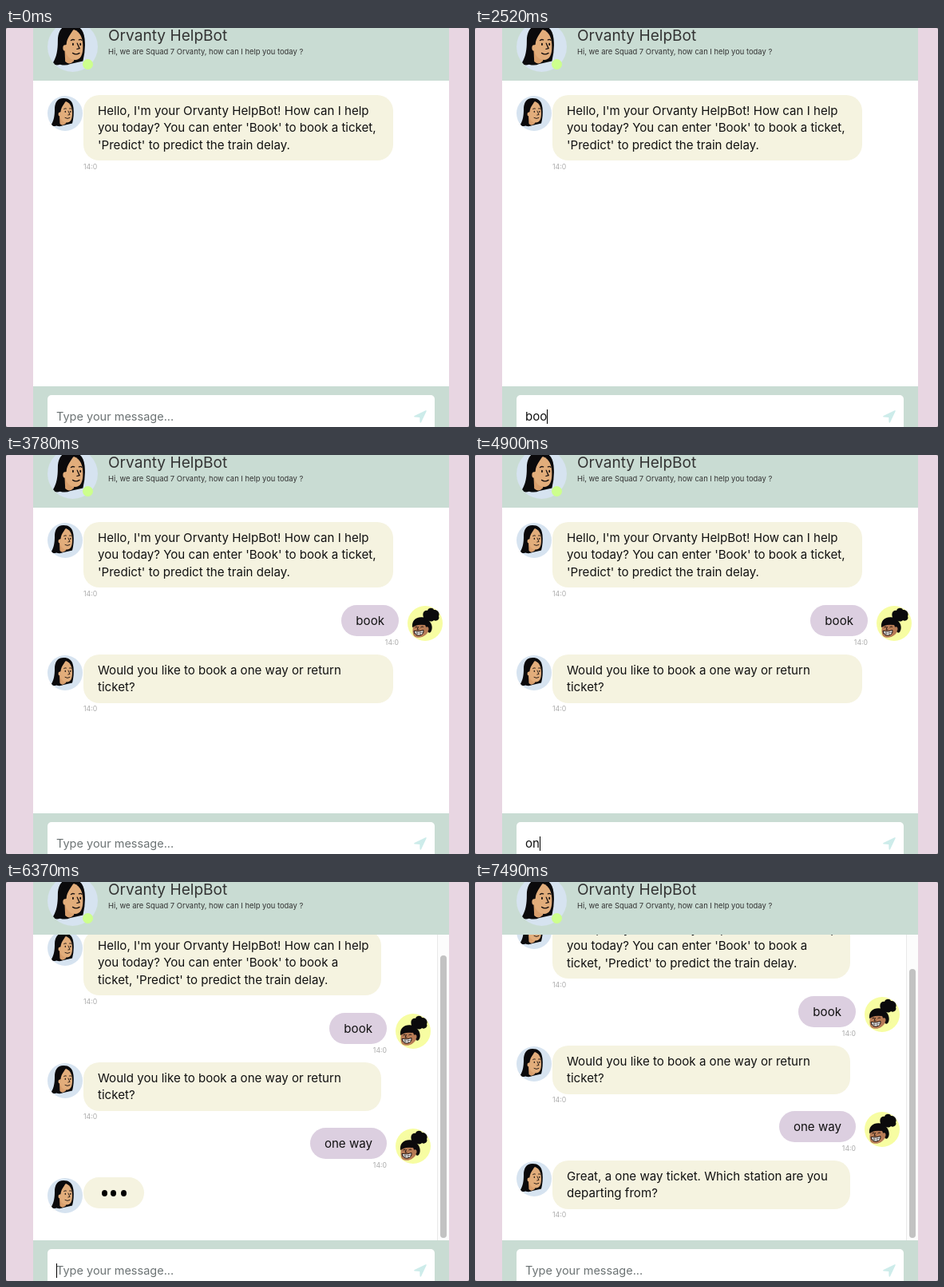
An HTML page for the animation above (8000 ms loop, 580 by 500 pixels).

```html
<!DOCTYPE html>
<html lang="en">
<head>
<meta charset="utf-8">
<title>Chat</title>
<style>
html, body { margin: 0; width: 100%; height: 100%; overflow: hidden; background: #777; }
#stage {
  position: relative; width: 580px; height: 500px; overflow: hidden;
  border-radius: 2px; background: #e8d6e2;
  font: 15.1px/21.43px Inter, sans-serif; color: #111; white-space: nowrap;
}
#stage div, #stage svg { position: absolute; }
.bar { left: 34px; width: 521px; background: #c9dcd3; }
.head { top: 0; height: 66px; }
.foot { top: 449px; height: 51px; }
.title { left: 94px; top: -4px; font-size: 19.1px; line-height: 26px; color: #333; }
.sub { left: 94px; top: 23px; font-size: 9.4px; line-height: 14px; color: #333; }
.status { left: 62px; top: 39px; width: 13px; height: 13px; border-radius: 50%; background: #cdff8d; }
#view { left: 34px; top: 66px; width: 521px; height: 383px; background: #fff; overflow: hidden; }
#chat { left: 0; top: 0; width: 521px; height: 383px; }
#chat.narrow { width: 506px; }
.msg { left: 0; right: 0; }
.msg svg { left: 18px; top: .5px; width: 44px; height: 44px; }
.msg.me svg { left: auto; right: 8.5px; top: 1px; }
.text { left: 63px; right: 70px; padding: 9px 18px; border-radius: 20px; background: #f5f3e0; }
.me .text { left: auto; right: 63px; background: #dccfe0; }
.time { left: 63px; font-size: 8.7px; line-height: 12px; color: #aaa; }
.me .time { left: auto; right: 63px; }
.typing .text { right: auto; width: 40px; height: 21px; }
.typing i { position: absolute; top: 16px; width: 7px; height: 8px; border-radius: 50%; background: #000; }
.narrow .wide, #chat:not(.narrow) .slim { display: none; }
#track { right: 0; top: 0; width: 14px; height: 383px; background: #fcfcfc; border-left: 1px solid #e9e9e9; }
#thumb { left: 3px; width: 8px; border-radius: 4px; background: #c2c2c2; }
.field { left: 18px; top: 11px; width: 485px; height: 54px; border-radius: 5px; background: #fff; }
#input { left: 11px; top: 16px; white-space: pre; }
#input.empty { font-size: 14.5px; color: #6c7374; }
#caret { top: 18px; width: 1px; height: 18px; background: #000; }
.send { left: 458px; top: 18px; width: 18px; height: 18px; }
</style>
</head>
<body>
<svg width="0" height="0" style="position:absolute">
  <clipPath id="disc"><circle cx="22" cy="22" r="22"/></clipPath>
  <symbol id="bot" viewBox="0 0 44 44">
    <g clip-path="url(#disc)">
      <rect width="44" height="44" fill="#d6e3f0"/>
      <path d="M20 3C12 3 9 9 9 17C9 25 8 31 4.500 36.500Q7 39 11 37.500Q16 39 20 37L31 34.500Q33.500 25 32.500 15C31.500 6 27 3 20 3Z" fill="#0b0a0c"/>
      <path d="M15 25L15.500 35Q19 38.500 23 34.500L24 30Z" fill="#d99f6d"/>
      <path d="M23 7C17 11 15 15 15 21C15 29 19 33.500 24 33.500C29 33.500 31 29 31 22C31 15 29 9 23 7Z" fill="#e2ad7b"/>
      <path d="M23 6C20 12 17 14 16.500 20L14 22L13 12Z" fill="#0b0a0c"/>
      <ellipse cx="15.300" cy="23" rx="1.800" ry="2.600" fill="#e2ad7b"/>
      <g fill="none" stroke="#1a1210" stroke-width=".9" stroke-linecap="round">
        <path d="M20.500 16.500Q22 15.200 23.500 16M27.500 16Q29 15.200 30 16.300M26 19L28 23.500L25.800 24M22 27.500Q25 29.500 28 27.500"/>
        <path d="M22.300 19.300V20.300M28.800 19.300V20.300" stroke-width="1.300"/>
      </g>
    </g>
  </symbol>
  <symbol id="user" viewBox="0 0 44 44">
    <g clip-path="url(#disc)"><rect width="44" height="44" fill="#f7fda2"/>
      <path d="M7 24C6 33 6 38 11 39.500C18 41 25 37 28 28L24 19L10 20Z" fill="#b77b55"/>
    </g>
    <path d="M6 27C5 18 11 13 20 14.500C18 9 21 5 25 6C26 2 32 2 33 5C38 4 41 10 39 13C41 17 36 20 33 18C31 20 28 20 26.500 18.500C31 22 32 29 29 33C27 35 25 33 25.500 30Q23 27 22 24Q14 23 10 25Z" fill="#0b0a0c"/>
    <ellipse cx="24.500" cy="29" rx="2" ry="2.800" fill="#b77b55"/>
    <path d="M8 31.500Q14 33 20 30.500Q20.500 36 15 37Q9 37.500 8 31.500Z" fill="#fff" stroke="#1a1210"/>
    <path d="M8 34Q14 35 19.500 33M12 32.500V36.500M16 32.500V36.500" fill="none" stroke="#1a1210" stroke-width=".6"/>
    <path d="M9.500 27Q11 25.600 12.500 27M16.500 27Q18 25.300 20 26.500M13.500 26L12 30H14.500" fill="none" stroke="#1a1210" stroke-width=".9"/>
  </symbol>
</svg>
<div id="stage">
  <div class="bar head">
    <svg style="left:18px;top:-8px;width:63px;height:63px"><use href="#bot"/></svg>
    <div class="status"></div>
    <div class="title">Orvanty HelpBot</div>
    <div class="sub">Hi, we are Squad 7 Orvanty, how can I help you today ?</div>
  </div>
  <div id="view">
    <div id="chat"></div>
    <div id="track"><div id="thumb"></div></div>
  </div>
  <div class="bar foot">
    <div class="field">
      <div id="input"></div>
      <div id="caret"></div>
      <svg class="send" viewBox="0 0 18 18"><path d="M16 2L2 8.800L9 9.200L9.300 16Z" fill="#cdecea" stroke="#cdecea" stroke-width="1.600" stroke-linejoin="round"/></svg>
    </div>
  </div>
</div>
<script>
const $ = id => document.getElementById(id);
const LOOP = 8000, VIEW = 383, LINE = 21.43;

// top: offset in the conversation; from / to: time on screen
const messages = [
  { top: 18, lines: 3, from: 0, text: "Hello, I'm your Orvanty HelpBot! How can I help<br>you today? You can enter 'Book' to book a <br class='slim'>ticket, <br class='wide'>'Predict' to predict the train delay." },
  { top: 122, lines: 1, from: 3290, me: true, text: "book" },
  { top: 184, typing: true, from: 3290, to: 3780 },
  { top: 184, lines: 2, from: 3780, text: "Would you like to book a one way or return<br>ticket?" },
  { top: 266, lines: 1, from: 6370, me: true, text: "one way" },
  { top: 328, typing: true, from: 6370, to: 6720 },
  { top: 328, lines: 2, from: 6720, text: "Great, a one way ticket. Which station are you<br>departing from?" }
];
const typed = [
  [0, ""], [2170, "b"], [2450, "bo"], [2520, "boo"], [3080, "book"], [3290, ""],
  [4760, "o"], [4900, "on"], [5320, "one"], [5670, "one "],
  [5810, "one w"], [5880, "one wa"], [5950, "one way"], [6370, ""]
];
const caretOn = [[770, 1260], [1820, 3600], [4130, 4690], [4760, 6480], [7000, 7490]];
const scrolls = [[0, 0], [6370, 24], [6720, 45]];

const at = (steps, t) => steps.filter(s => s[0] <= t).pop()[1];

for (const m of messages) {
  const el = m.el = document.createElement("div");
  el.className = "msg" + (m.me ? " me" : "") + (m.typing ? " typing" : "");
  el.style.top = m.top + "px";
  const body = m.typing
    ? [22.5, 34, 46.5].map(x => `<i style="left:${x}px"></i>`).join("")
    : m.text;
  const time = m.typing ? "" : `<div class="time" style="top:${m.lines * LINE + 19.5}px">14:0</div>`;
  el.innerHTML = `<svg><use href="#${m.me ? "user" : "bot"}"/></svg><div class="text">${body}</div>${time}`;
  m.dots = el.querySelectorAll("i");
  $("chat").append(el);
}

function hop(ms) {
  const p = ms / 600;
  return p > 0 && p < 1 ? -5 * Math.sin(Math.PI * p) ** 2 : 0;
}

function draw(t) {
  for (const m of messages) {
    m.el.style.display = t >= m.from && t < (m.to || LOOP) ? "" : "none";
    m.dots.forEach((dot, i) => {
      dot.style.transform = `translateY(${hop(t - m.from - i * 100)}px)`;
    });
  }

  const scroll = at(scrolls, t), total = VIEW + scroll;
  $("chat").classList.toggle("narrow", scroll > 0);
  $("chat").style.top = -scroll + "px";
  $("track").style.display = scroll ? "" : "none";
  const top = scroll * VIEW / total + 3;
  $("thumb").style.top = top + "px";
  $("thumb").style.height = VIEW - 3 - top + "px";

  const value = at(typed, t), input = $("input");
  input.textContent = value || "Type your message...";
  input.classList.toggle("empty", !value);
  $("caret").style.left = 11 + (value ? input.getBoundingClientRect().width : 0) + "px";
  $("caret").style.display = caretOn.some(([a, b]) => t >= a && t < b) ? "" : "none";
}

const start = performance.now();
function tick() {
  draw((performance.now() - start) % LOOP);
  requestAnimationFrame(tick);
}
tick();
</script>
</body>
</html>
```
